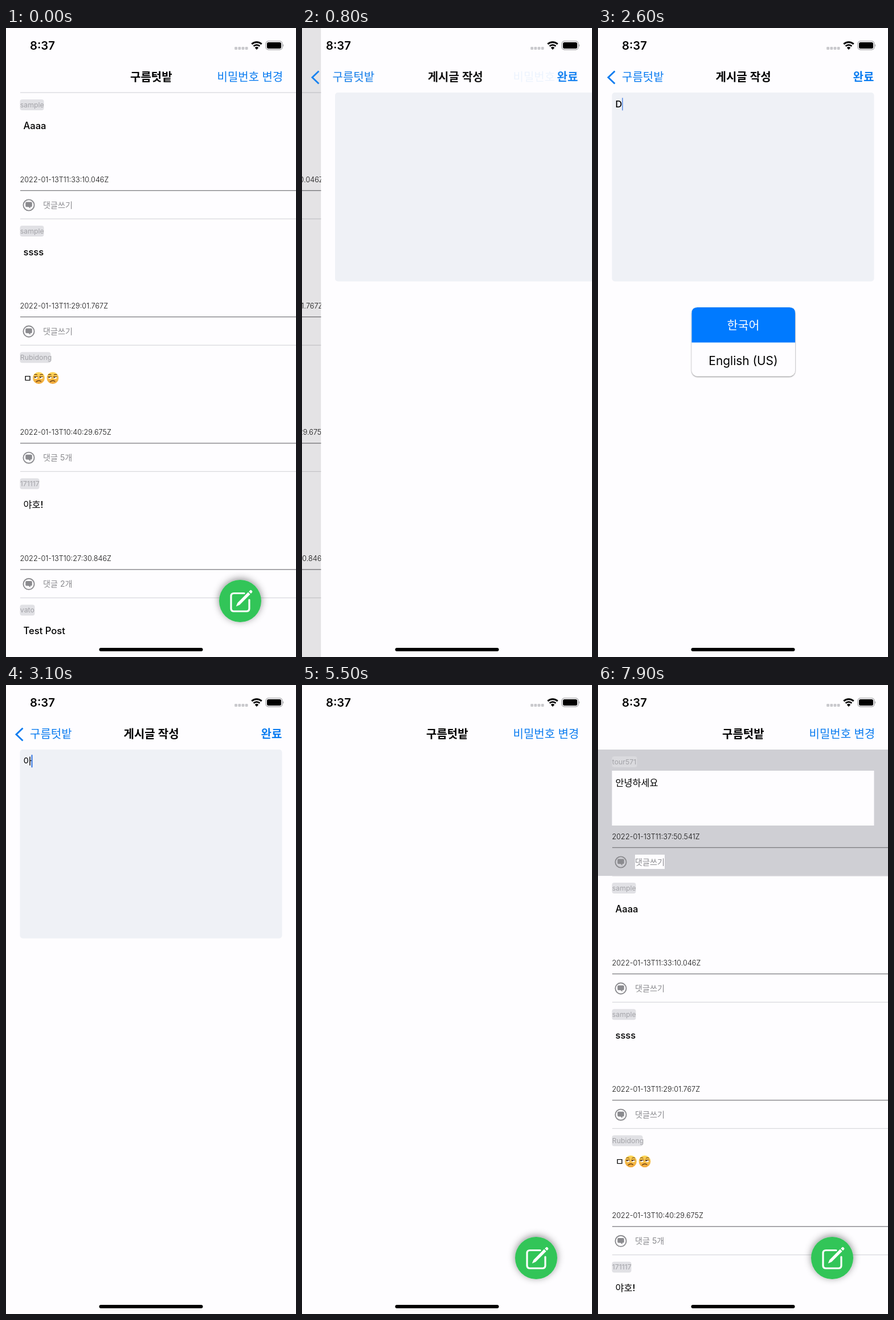
Write an HTML page that moves like this. It is 509 px wide and 1101 px high and loops after 8000 ms.

```html
<!DOCTYPE html>
<html lang="ko">
<head>
<meta charset="utf-8">
<style>
html, body { margin: 0; width: 100%; height: 100%; overflow: hidden; background: #fefdff; }
svg { display: block; width: 100vw; height: 100vh; font-family: Inter, "Noto Sans CJK KR", "Noto Sans CJK", sans-serif; }
</style>
</head>
<body>
<svg id="stage" viewBox="0 0 509 1101"></svg>
<script>
const LOOP = 8000, STEP = 100, W = 509, H = 1101;
const BG = '#fefdff', BLUE = '#0a7cf0', GRAY = '#8b8b8f', ROW = 221.1, TOP = 113;
const FARM = '구름텃밭';

const posts = [
  { user: 'tour571', tag: 44, text: '안녕하세요', time: '2022-01-13T11:37:50.541Z', note: '댓글쓰기' },
  { user: 'sample', tag: 42, text: 'Aaaa', time: '2022-01-13T11:33:10.046Z', note: '댓글쓰기' },
  { user: 'sample', tag: 42, text: 'ssss', time: '2022-01-13T11:29:01.767Z', note: '댓글쓰기' },
  { user: 'Rubidong', tag: 54, text: 'ㅁ', faces: 2, time: '2022-01-13T10:40:29.675Z', note: '댓글 5개' },
  { user: '171117', tag: 34, text: '야호!', time: '2022-01-13T10:27:30.846Z', note: '댓글 2개' },
  { user: 'vato', tag: 26, text: 'Test Post', time: '', note: '' }
];

const text = (x, y, s, size, weight = 400, fill = '#000', extra = '') =>
  `<text x="${x}" y="${y}" font-size="${size}" font-weight="${weight}" fill="${fill}" ${extra}>${s}</text>`;
const rect = (x, y, w, h, fill, r = 0, extra = '') =>
  `<rect x="${x}" y="${y}" width="${w}" height="${h}" fill="${fill}" rx="${r}" ${extra}/>`;
const path = (d, stroke, width, extra = '') =>
  `<path d="${d}" fill="none" stroke="${stroke}" stroke-width="${width}" ${extra}/>`;
const group = (id, body, extra = '') => `<g id="${id}" ${extra}>${body}</g>`;

const face = x => `<g transform="translate(${x} 57.5)">
  <circle r="10.4" fill="url(#skin)"/>
  <path d="M-8.2-2h6.4q-.4 3.4-3.2 3.4t-3.2-3.4zM1-2h6.4q-.4 3.4-3.2 3.4t-3.2-3.4z" fill="#fff"/>
  <path d="M-8-1.9h3.4a1.7 1.7 0 0 1-3.4 0zM1.2-1.9h3.4a1.7 1.7 0 0 1-3.4 0z" fill="#4a2c12"/>
  ${path('M-8.6-2.2h7M.8-2.2h7M-8-5.6q3-1.6 5.4.4M2-5.2q2.6-2 5.4-.4', '#6b3f14', 1.1)}
  ${path('M-4.4 6.4q4-3.4 8.2-.6', '#6b3f14', 1.4, 'stroke-linecap="round"')}</g>`;

const bubble = `<circle cx="40" cy="197" r="9.6" fill="none" stroke="${GRAY}" stroke-width="1.9"/>
  <path d="M36 191.6h8q1.8 0 1.8 1.8v5q0 1.8-1.8 1.8h-1.4v2.8l-3-2.8h-3.6q-1.8 0-1.8-1.8v-5q0-1.8 1.8-1.8z" fill="${GRAY}"/>`;

function row(p, i, lit) {
  const back = lit
    ? rect(0, 0, W, ROW, '#cfcfd4') + rect(24.5, 37, 460, 96, BG) + rect(65, 184, 52, 25, BG)
    : rect(25, -0.6, W, 1.3, '#dadade');
  const faces = p.faces ? face(57.5) + face(82) : '';
  const body = back +
    rect(24.5, 12, p.tag, 19, lit ? '#dadade' : '#e1e1e5', 4) +
    text(24.8, 26, p.user, 12.3, 400, '#a3a3a8') +
    text(30.5, 63.5, p.text, p.text > 'z' ? 16.3 : 16.6, 500) + faces +
    text(24.5, 157, p.time, 12.7, 300, '#111') +
    rect(25, 170.9, W, 1.3, '#7d7d81') + bubble +
    text(65, 202.2, p.note, 14.1, 400, GRAY);
  return `<g transform="translate(0 ${TOP + i * ROW})">${body}</g>`;
}
const rows = (from, lit) => posts.slice(from, from + 5).map((p, i) => row(p, i, lit && !i)).join('');

const button = `<circle cx="411" cy="1003" r="37" fill="#32c558" filter="url(#glow)"/>
  ${path('M418 989.5H400q-5 0-5 5V1016q0 5 5 5H422q5 0 5-5V1001', '#fff', 3.2, 'stroke-linecap="round"')}
  <path d="M403.8 1012.6l2.6-6.4 18.6-18.6 3.6 3.6-18.5 18.6zM426.2 986.4l2-2q1.4-1.2 2.8.1l.8.8q1.3 1.4.1 2.8l-2 2z" fill="#fff"/>`;

const popup = `<g filter="url(#drop)">${rect(164.5, 489, 181.5, 120.5, BG, 10)}</g>
  <path d="M164.5 550.5V499q0-10 10-10H336q10 0 10 10v51.5z" fill="#007aff"/>
  ${text(255, 528, '한국어', 20.6, 300, '#fff', 'text-anchor="middle"')}
  ${text(255, 589.5, 'English (US)', 20.9, 400, '#000', 'text-anchor="middle"')}`;

const dots = [401.2, 407.4, 413.6, 419.8].map(x => rect(x, 33, 4.8, 5, '#c9c9cd', 1.3)).join('');
const status = text(42, 37.8, '8:37', 20.2, 600) + dots +
  path('M431.3 28.2a12.6 12.6 0 0 1 17.4 0', '#000', 3) +
  path('M434.6 31.8a7.8 7.8 0 0 1 10.8 0', '#000', 2.8) +
  '<path d="M440 38l-3.3-3.6a4.8 4.8 0 0 1 6.6 0z"/>' +
  rect(456.1, 23, 28.8, 14.9, 'none', 4.4, 'stroke="#929296" stroke-width="1.1"') +
  rect(458, 24.9, 25, 11.1, '#000', 2.8) +
  '<path d="M486.2 28q2.2 2.4 0 5z" fill="#929296"/>';

const stage = document.getElementById('stage');
stage.innerHTML = `<defs>
  <linearGradient id="skin" x2="0" y2="1"><stop stop-color="#fdd85a"/><stop offset="1" stop-color="#f0a63a"/></linearGradient>
  <filter id="glow" x="-40%" y="-40%" width="180%" height="180%"><feDropShadow dx="0" dy="-2" stdDeviation="6.5" flood-opacity=".45"/></filter>
  <filter id="drop" x="-10%" y="-10%" width="120%" height="120%"><feDropShadow dx="0" dy="1" stdDeviation="1.3" flood-opacity=".55"/></filter>
  </defs>` +
  rect(0, 0, W, H, BG) +
  group('list', group('before', rows(1)) + group('after', rows(0)) + group('picked', rows(0, true)) + button) +
  rect(0, 0, 0, H, '#000', 0, 'id="dim"') +
  group('editor', rect(0, 0, W, H, BG) + rect(24.5, 113, 460, 330.5, '#eff1f6', 5) +
    text(30.5, 139.2, '', 16.3, 500, '#000', 'id="draft"') + rect(0, 122, 2, 22.5, '#2f72e0', 1, 'id="caret"')) +
  group('farm', text(218, 93.3, FARM, 20, 600)) +
  group('change', text(370.5, 93.3, '비밀번호 변경', 20, 500, BLUE)) +
  group('chevron', path('M29.5 75.5L18 86.5L29.5 97.5', BLUE, 2.9)) +
  group('back', text(42, 93.3, FARM, 20, 400, BLUE)) +
  group('title', text(206.5, 93.3, '게시글 작성', 20, 600)) +
  group('done', text(447.5, 93.3, '완료', 20, 600, BLUE)) +
  group('popup', popup) + status + rect(163.5, 1085, 182, 6, '#000', 3);

const $ = {};
stage.querySelectorAll('[id]').forEach(e => $[e.id] = e);
const clamp = v => Math.max(0, Math.min(1, v));
const ramp = (t, a, b) => clamp((t - a) / (b - a));
const fade = (el, a) => { el.setAttribute('opacity', a); el.setAttribute('display', a > 0 ? 'inline' : 'none'); };
const slide = (el, x) => el.setAttribute('transform', `translate(${x} 0)`);

// critically damped spring for the page push
function push(t) {
  if (t < 500) return 0;
  if (t > 1100) return 1;
  const x = (t - 450) * 0.0126;
  return 1 - (1 + x) * Math.exp(-x);
}

const typing = ['ㅇ', '아', '안', '안ㄴ', '안녀', '안녕', '안녕ㅎ', '안녕하', '안녕핫', '안녕하세', '안녕하세요'];
function draftAt(t) {
  if (t >= 3000) return typing[Math.min(typing.length - 1, Math.floor((t - 3000) / 100))];
  return t >= 2100 && t < 2800 ? 'D' : '';
}
function caretAt(t) {
  if (t < 1500) return 0;
  if (t < 2100) return t < 2000 ? 1 : 0.5;
  if (t < 2800) return t < 2600 ? 1 : 0.6 - ramp(t, 2600, 2700) * 0.6;
  if (t < 4500) return 1;
  if (t < 4800) return t < 4600 ? 0.5 : 0;
  return t < 4900 ? 0.2 : 1;
}

function render(t) {
  const p = push(t), rest = 1 - p;
  const k = ramp(t, 4900, 5500), q = k * k * (3 - 2 * k);
  const open = t < 5500 ? p * (1 - q) : 0;

  slide($.list, q > 0 ? 0 : -0.3 * W * p);
  fade($.before, t < 4900 ? 1 : 0);
  fade($.after, t >= 6100 && t < 7900 ? 1 : 0);
  fade($.picked, t >= 7900 ? 1 : 0);
  $.dim.setAttribute('width', W * rest);
  fade($.dim, 0.108 * p * (q > 0 ? 0 : 1));
  slide($.editor, W * rest);
  fade($.editor, p > 0 ? 1 - q : 0);

  slide($.farm, q > 0 ? 0 : -176 * p);
  fade($.farm, q > 0 ? q : rest);
  fade($.change, q > 0 ? q : rest);
  slide($.back, 176 * rest);
  slide($.title, 215 * rest);
  for (const el of [$.chevron, $.back, $.title, $.done]) fade(el, open);

  const s = draftAt(t);
  $.draft.textContent = s;
  $.caret.setAttribute('x', 29.5 + (s === 'D' ? 12.5 : 15 * s.length));
  fade($.caret, caretAt(t));
  fade($.popup, t < 2600 ? 0 : 1 - ramp(t, 2700, 2900));
}

let start;
function tick(now) {
  start ??= now;
  const t = (now - start) % LOOP;
  render(Math.floor(t / STEP) * STEP);
  requestAnimationFrame(tick);
}
render(0);
requestAnimationFrame(tick);
</script>
</body>
</html>
```
